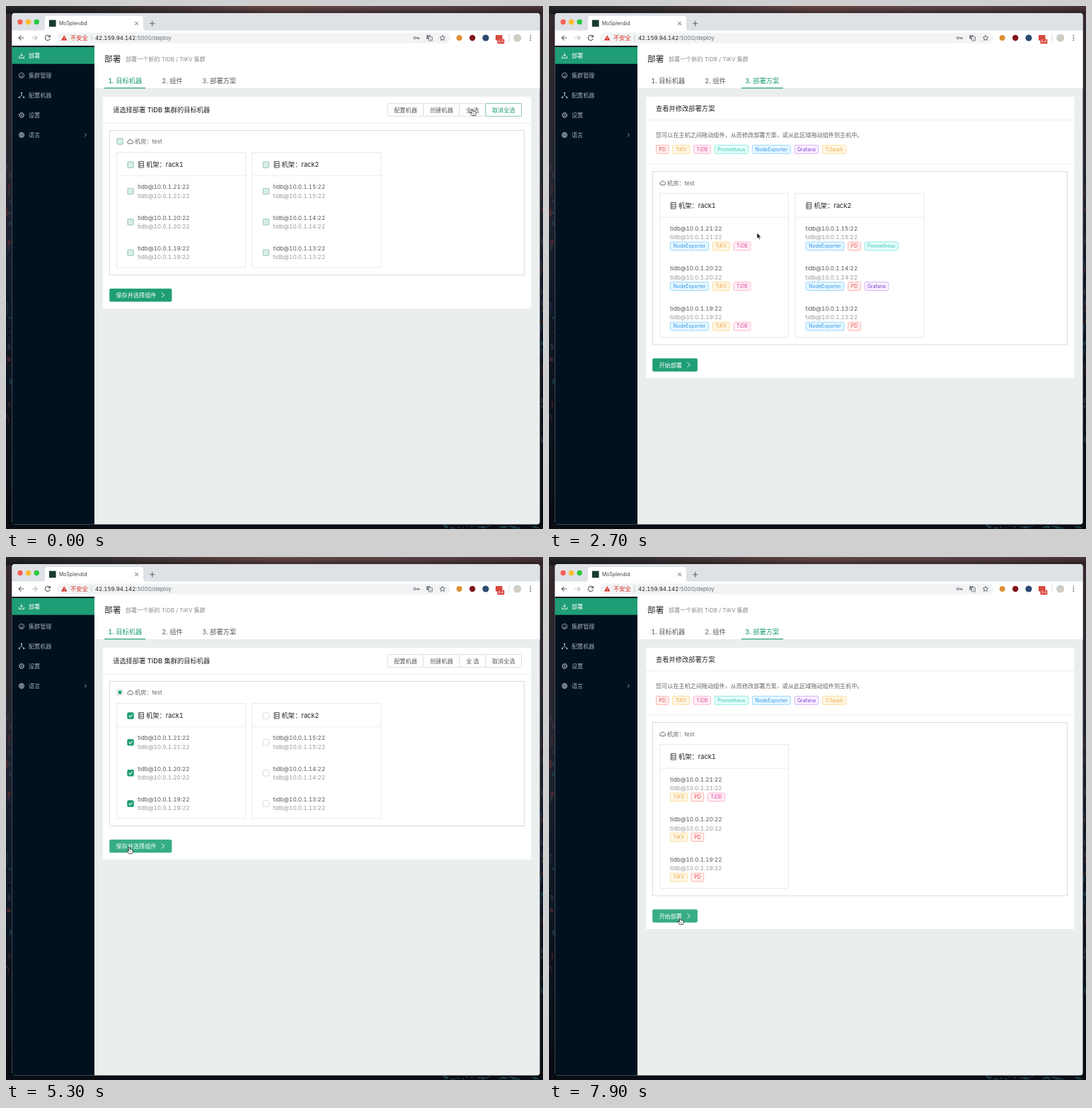
Recreate the animation shown at these times as an HTML page. Size 759 by 738 pixels, loop 8 s.

```html
<!DOCTYPE html>
<html lang="zh-CN">
<head>
<meta charset="utf-8">
<title>MoSplendid</title>
<style>
html, body { margin: 0; width: 100%; height: 100%; overflow: hidden; background: #10141b; }
svg { display: block; width: 100vw; height: 100vh; }
text { font-family: Inter, "Noto Sans CJK SC", "Noto Sans CJK", sans-serif; font-variant-numeric: tabular-nums; white-space: pre; }
</style>
</head>
<body>
<svg viewBox="0 0 759 738" preserveAspectRatio="none">
  <defs>
    <linearGradient id="top"><stop offset="0" stop-color="#24272a"/><stop offset=".2" stop-color="#3a3335"/><stop offset=".5" stop-color="#6b4a4a"/><stop offset=".8" stop-color="#5d4448"/><stop offset="1" stop-color="#4a363b"/></linearGradient>
    <linearGradient id="shade" x2="0" y2="1"><stop offset="0" stop-opacity="0"/><stop offset="1" stop-opacity=".45"/></linearGradient>
    <linearGradient id="side" x2="0" y2="1"><stop offset="0" stop-color="#33282d"/><stop offset=".3" stop-color="#252630"/><stop offset=".55" stop-color="#101a28"/><stop offset="1" stop-color="#080b11"/></linearGradient>
    <linearGradient id="face" x2="1" y2="1"><stop offset="0" stop-color="#c6d2dc"/><stop offset="1" stop-color="#d9c9b2"/></linearGradient>
  </defs>
  <g id="frame"></g>
  <g id="view"></g>
</svg>
<script>
const GREEN = '#1f9e76', HOVER = '#37ad85', LINE = '#e8e8e8', EDGE = '#d9d9d9';
const BASE = 8.17, BIG = 9.28;

const rect = (x, y, w, h, fill, more = '') =>
  `<rect x="${x}" y="${y}" width="${w}" height="${h}" fill="${fill}" ${more}/>`;
const path = (d, stroke, w = 1, more = 'fill="none"') =>
  `<path d="${d}" stroke="${stroke}" stroke-width="${w}" ${more}/>`;
const circle = (x, y, r, fill, more = '') => `<circle cx="${x}" cy="${y}" r="${r}" fill="${fill}" ${more}/>`;
const text = (x, y, s, fill = '#595959', size = BASE, more = '') =>
  `<text x="${x}" y="${y}" fill="${fill}" font-size="${size}" ${more}>${s}</text>`;
const mid = 'text-anchor="middle"', bold = 'font-weight="500"';
const outline = (color, w = .9) => `stroke="${color}" stroke-width="${w}"`;

// ---- static surroundings ----

function wallpaper() {
  let out = rect(0, 0, 759, 738, 'url(#side)') + rect(0, 0, 759, 11, 'url(#top)') +
    rect(0, 0, 759, 11, 'url(#shade)') + rect(0, 731, 759, 7, '#0a0d13');
  let seed = 7;
  const rnd = () => (seed = seed * 16807 % 2147483647) / 2147483647;
  const tones = ['#5d2a2f', '#1d4656', '#3a3440', '#0c1017'];
  for (let i = 0; i < 70; i++) {
    const x = i % 2 ? 755 + rnd() * 2 : rnd() * 5;
    out += rect(x, 190 + rnd() * 420, 1 + rnd() * 3, 2 + rnd() * 9, tones[Math.floor(rnd() * 4)], 'opacity=".65"');
  }
  // city lights along the lower right
  for (let i = 0; i < 24; i++)
    out += rect(610 + rnd() * 145, 732 + rnd() * 4, 2 + rnd() * 5, 1.5, '#2a5a6c', 'opacity=".7"');
  return out;
}

function browser() {
  const ink = '#5f6368';
  let out = rect(8.5, 10, 746, 721.5, '#ebeeee', 'rx="4"');
  out += `<path d="M8.5 35V14q0-4 4-4H750.5q4 0 4 4V35z" fill="#dee1e6"/>`;
  ['#ff5f57', '#febc2e', '#28c840'].forEach((c, i) => out += circle(20 + i * 11.6, 22.5, 3.7, c));
  out += '<path d="M51 35q4 0 4-4V18q0-4 4-4H190q4 0 4 4V31q0 4 4 4z" fill="#fff"/>';
  out += rect(61, 19.7, 9.6, 9.6, '#173b32');
  out += text(75, 27.3, 'MoSplendid', '#3c4043', 7);
  out += path('M182.3 22.3l4.6 4.6m0-4.6l-4.6 4.6', ink);
  out += path('M203 24.7h7.4M206.7 21v7.4', ink, 1.1);
  out += rect(8.5, 34.5, 746, 21.5, '#fff');
  out += path('M25.5 45h-7.5m3.4-3.4L18 45l3.4 3.4', ink, 1.1);
  out += path('M36.5 45h7.5m-3.4-3.4L44 45l-3.4 3.4', '#b9bcbf', 1.1);
  out += path('M62 43a3.6 3.6 0 1 0 .4 3M62.4 41v2.6h-2.6', ink, 1.1);
  out += rect(72, 37.5, 556, 15, '#f1f3f4', 'rx="7.5"');
  out += '<path d="M82.2 41.2l4.2 7.4h-8.4z" fill="#d93025"/>' + path('M82.2 43.8v2.2m0 .7v1', '#fff', .8);
  out += text(91, 48, '不安全', '#d93025', 8.3) + rect(120.7, 40.5, .8, 9, '#c4c7ca');
  out += text(126, 48, '42.159.94.142<tspan fill="#6b7075">:5000/deploy</tspan>', '#202124', 7.87);
  // address bar actions
  out += circle(577.7, 45, 1.6, 'none', outline(ink)) + path('M579.4 45h4.4v1.8m-1.8-1.8v1.4', ink, 1.2);
  out += rect(594.5, 41, 5, 5.6, ink, 'rx=".6"') + rect(597.5, 43.2, 5, 5.8, '#fff', `rx=".6" ${outline(ink, .8)}`);
  out += text(595.4, 45.4, 'G', '#fff', 4.2) + text(598.4, 47.8, '文', ink, 3.6);
  let star = '';
  for (let i = 0; i < 10; i++) {
    const r = i % 2 ? 1.8 : 4, a = i * Math.PI / 5;
    star += (i ? 'L' : 'M') + (617 + r * Math.sin(a)) + ' ' + (45.2 - r * Math.cos(a));
  }
  out += path(star + 'z', ink, .9);
  // extensions
  out += circle(640.7, 45, 4, '#dd9138') + circle(659.2, 45, 4.2, '#80141b') + circle(678, 45, 4.6, '#2b4a70');
  out += rect(692, 41, 9.5, 7.5, '#d64a40') + rect(694.5, 46.5, 9.8, 6.8, '#d5392f', 'rx="1"');
  out += text(699.4, 52.3, '64', '#fff', 5.8, mid);
  out += rect(710.7, 39, .8, 12, '#d0d3d6') + circle(722.7, 45, 5.6, 'url(#face)');
  for (const y of [41.8, 45, 48.2]) out += circle(741.3, y, .9, ink);
  return out;
}

function sidebar() {
  const tone = '#a5adb5';
  let out = rect(8.5, 56, 116.5, 675.5, '#01111f') + rect(8.5, 58, 116.5, 23.7, GREEN);
  ['部署', '集群管理', '配置机器', '设置', '语言'].forEach((s, i) =>
    out += text(32, 73 + i * 28, s, i ? tone : '#fff', 8.1));
  out += path('M22 66.3v4.6m-1.7-1.7l1.7 1.8 1.7-1.8M18.6 70.8v2.6h6.8v-2.6', '#fff', .9);
  out += circle(22, 98, 3.6, 'none', outline(tone)) + path('M22 98.6l1.6-1.8M20 99.8h4', tone, .9);
  out += path('M22 123v3l-3 2.6m3-2.6l3 2.6', tone, .9);
  for (const [x, y] of [[22, 122.8], [18.8, 129], [25.2, 129]]) out += circle(x, y, 1.2, tone);
  out += circle(22, 154, 3.2, 'none', outline(tone, 1.4) + ' stroke-dasharray="1.7 .8"') +
    circle(22, 154, 2.7, 'none', outline(tone, .7)) + circle(22, 154, 1.1, tone);
  out += circle(22, 182, 3.6, 'none', outline(tone)) +
    path('M18.5 182h7M22 178.5v7M19.2 180.2h5.6M19.2 183.8h5.6', tone, .7) +
    `<ellipse cx="22" cy="182" rx="1.7" ry="3.5" fill="none" ${outline(tone, .7)}/>`;
  return out + path('M111.3 179.8l2.2 2.2-2.2 2.2', tone, .9);
}

function header() {
  return rect(125, 56, 629.5, 60.5, '#fff') + rect(125, 116, 629.5, .8, LINE) +
    text(139, 79, '部署', '#262626', 11.7, bold) +
    text(169, 77.6, '部署一个新的 TiDB / TiKV 集群', '#8c8c8c', 8.1);
}

// ---- page parts ----

const square = (x, y, fill, more) => rect(x - 4.2, y - 4.2, 8.4, 8.4, fill, 'rx="1" ' + more);
const tick = (x, y, color) => path(`M${x - 2.3} ${y}l1.7 1.8 3-3.5`, color, 1.1);

function checkbox(x, y, level, edge = EDGE) {
  let out = square(x, y, '#fff', outline(edge));
  if (level) out += square(x, y, GREEN,
    `fill-opacity="${level}" stroke-opacity="${Math.min(1, level * 1.5)}" ${outline(GREEN)}`);
  return level === 1 ? out + tick(x, y, '#fff') : out;
}

const card = (title, h, line, base) => rect(137, 128, 605.5, h, '#fff') +
  rect(137, line, 605.5, .8, LINE) + text(151, base, title, '#262626', BIG, bold);

const dotted = (y, h) => rect(146.5, y, 586, h, 'none', 'stroke="#b4b4b4" stroke-dasharray="1 1"');

const button = (x, y, w, label, hot) => rect(x + .2, y + .2, w - .3, 18.6, hot ? HOVER : GREEN, 'rx="2"') +
  text(x + 9.4, y + 12.9, label, '#fff') + path(`M${x + w - 14.6} ${y + 6}l4 3.4-4 3.4`, '#fff', .9);

const cloud = (x, y) => path(`M${x - 2.4} ${y + 2.8}a1.9 1.9 0 0 1-.2-3.7a2.7 2.7 0 0 1 5.2 0a1.9 1.9 0 0 1-.2 3.7z`, '#555', .9);

const server = (x, y) => path(`M${x - 3.4} ${y - 4.2}h6.8v8.6h-6.8zm0 2.9h6.8m-6.8 2.9h6.8`, '#444', .9) +
  path(`M${x - 2.2} ${y - 2.7}h1.2m-1.2 2.9h1.2m-1.2 2.8h1.2`, '#444', .8);

const frameBox = (x, y, h, head) => rect(x + .5, y + .5, 182, h, '#fff', outline(LINE)) +
  rect(x, y + head, 183, .8, LINE);

function host(x, y, ip) {
  const s = `tidb@10.0.1.${ip}:22`;
  return text(x, y, s, '#595959') + text(x, y + 12.4, s, '#9a9a9a');
}

const RACKS = [
  { x: 156, name: 'rack1', ips: [21, 20, 19] },
  { x: 347.6, name: 'rack2', ips: [15, 14, 13] }
];

const TAGS = {
  PD: [18.5, '#e2434a', '#fff1f0', '#ffa8a3'],
  TiKV: [25, '#eba53c', '#fff7e6', '#ffd88f'],
  TiDB: [25, '#e2429a', '#fff0f6', '#ffadd2'],
  Prometheus: [48.5, '#34c3b6', '#e6fffb', '#87e8de'],
  NodeExporter: [55, '#3396ee', '#e6f7ff', '#91d5ff'],
  Grafana: [34.8, '#7a3fd0', '#f9f0ff', '#d3adf7'],
  TiSpark: [34.5, '#eba53c', '#fff7e6', '#ffd88f']
};

function tags(x, y, names) {
  return names.map(name => {
    const [w, ink, fill, edge] = TAGS[name];
    const s = rect(x + .5, y - 5.8, w - 1, 11.8, fill, 'rx="1.8" ' + outline(edge)) +
      text(x + w / 2, y + 2.4, name, ink, 6.95, mid);
    x += w + 4.7;
    return s;
  }).join('');
}

// ---- pages ----

function machines(t) {
  const first = t < 800;
  const level = first ? [.18, .6][t / 100] || 1 : 1;
  const picked = [level, t >= 4500 ? 0 : level];
  let out = card('请选择部署 TiDB 集群的目标机器', 299, 165, 150);
  const active = !first ? -1 : t < 100 ? 3 : 2;
  const edges = [539.5, 590, 641, 678, 728.5];
  const cell = i => rect(edges[i], 137.5, edges[i + 1] - edges[i], 18, '#fff', 'rx="1" ' + outline(i === active ? '#7cc5a9' : EDGE, .8)) +
    text((edges[i] + edges[i + 1]) / 2, 149.6, ['配置机器', '创建机器', '全 选', '取消全选'][i], i === active ? GREEN : '#595959', BASE, mid);
  out += [0, 1, 2, 3].map(cell).join('') + (active < 0 ? '' : cell(active));
  out += dotted(175.5, 204) + cloud(175.7, 191.3) + text(182, 194.2, '机房：test', '#666');
  out += picked[1] || first ? checkbox(161, 191, level) : checkbox(161, 191, 0) + rect(158.6, 188.6, 4.8, 4.8, GREEN);
  RACKS.forEach(({ x, name, ips }, i) => {
    out += frameBox(x, 206, 162.5, 33.3) + checkbox(x + 20, 224, picked[i]) + server(x + 35, 223.6);
    out += text(x + 42, 227.2, '机架：' + name, '#222', BIG);
    ips.forEach((ip, k) => out += checkbox(x + 20, 261.6 + k * 43.2, picked[i]) + host(x + 30, 258.4 + k * 43.2, ip));
  });
  return out + button(146, 398.5, 88.5, '保存并选择组件', t >= 600 && first || t >= 5100);
}

function parts(t) {
  const unwatched = t >= 6100;
  const rows = [
    ['PD', 'PD 组件负责协调事务与调度数据，必选', 2],
    ['TiKV', 'TiKV 组件负责存储数据，必选', 2],
    ['TiDB', 'TiDB 组件提供 SQL 层计算功能，若不勾选则只部署 KV 数据库', 1],
    ['监控（Prometheus、Node Exporter 及 Grafana）', '收集并存储所有组件及节点的监控，并提供可视化界面展示', unwatched ? 0 : 1],
    ['TiSpark', 'TiSpark 组件可以计算大型分析型 SQL（OLAP）', 0],
    ['Supervise 进程守护', '在组件进程崩溃时基于 Supervise 自动重启组件（注：不会开机自启动）', 1]
  ];
  let out = card('请选择需要部署的 TiDB 组件', 344.5, 160.5, 148);
  rows.forEach(([name, note, state], i) => {
    const y = 181 + i * 44.25;
    out += state === 2
      ? square(155.5, y, '#f5f5f5', outline(EDGE)) + tick(155.5, y, '#b0b0b0')
      : checkbox(155.5, y, state, i === 3 && unwatched ? GREEN : EDGE);
    out += text(165, y + 2.9, name, state === 2 ? '#bfbfbf' : '#555') + text(151, y + 18.7, note, '#8c8c8c');
  });
  const hot = t >= 1300 && t < 1500 || t >= 6600;
  return out + button(150.7, 440, 105.3, '保存并预览部署方案', hot);
}

function plan(t) {
  const small = t >= 6800;
  const layout = small
    ? [[['TiKV', 'PD', 'TiDB'], ['TiKV', 'PD'], ['TiKV', 'PD']]]
    : [Array(3).fill(['NodeExporter', 'TiKV', 'TiDB']),
      [['NodeExporter', 'PD', 'Prometheus'], ['NodeExporter', 'PD', 'Grafana'], ['NodeExporter', 'PD']]];
  let out = card('查看并修改部署方案', 397, 160.5, 148);
  out += text(151, 184.6, '您可以在主机之间拖动组件，从而修改部署方案，或从此区域拖动组件到主机中。', '#666', 8.14);
  out += tags(151, 202.2, Object.keys(TAGS)) + rect(137, 222.3, 605.5, .8, LINE);
  out += dotted(233.5, 244.5) + cloud(160.7, 249.8) + text(167, 252.6, '机房：test', '#666');
  layout.forEach((rows, i) => {
    const { x, name, ips } = RACKS[i];
    out += frameBox(x, 264, 203, 33.8) + server(x + 19.7, 281.7);
    out += text(x + 27, 285.2, '机架：' + name, '#222', BIG);
    rows.forEach((names, k) => {
      const y = 316.6 + k * 56.6;
      out += host(x + 15, y, ips[k]) + tags(x + 15, y + 22.2, names);
    });
  });
  return out + button(146, 497, 64, '开始部署', t >= 7900);
}

// ---- timeline ----

const PAGES = [machines, parts, plan];
const VISITS = [[0, 0], [800, 1], [1500, 2], [3700, 0], [5400, 1], [6800, 2]];
const TABS = [[139, 58, '1. 目标机器'], [215, 39, '2. 组件'], [272, 59, '3. 部署方案']];
const MOVES = [
  [0, 660, 150, 'hand'], [100, 660, 150, 'arrow'], [700, 190, 410, 'hand'], [900, 194, 392, 'beam'],
  [1100, 200, 344, 'beam'], [1300, 203, 440, 'hand'], [1400, 200, 452, 'hand'], [1500, 199, 451, 'arrow'],
  [1800, 199, 450, 'arrow'], [2600, 300, 330, 'arrow'], [3300, 190, 150, 'arrow'], [3400, 190, 150, 'arrow'],
  [3500, 178, 112, 'hand'], [3600, 176, 108, 'hand'], [3800, 176, 108, 'arrow'], [4400, 367, 226, 'hand'],
  [4600, 367, 226, 'arrow'], [5200, 176, 412, 'hand'], [5300, 175, 414, 'hand'], [5500, 175, 410, 'arrow'],
  [6000, 156, 315, 'hand'], [6200, 156, 318, 'arrow'], [6400, 159, 390, 'arrow'], [6600, 202, 450, 'hand'],
  [6700, 202, 450, 'hand'], [6800, 202, 450, 'arrow'], [7600, 286, 110, 'hand'], [7700, 262, 210, 'arrow'],
  [7900, 186, 514, 'hand']
];
const SHAPES = {
  arrow: path('M0 0v8.3l1.9-1.7 1.3 2.9 1.4-.6-1.3-2.8h2.7z', '#fff', .7, 'fill="#111"'),
  beam: path('M-2.3-4.4q2.3 0 2.3 1.4v6q0 1.4-2.3 1.4M2.3-4.4Q0-4.4 0-3M2.3 4.4Q0 4.4 0 3M-1.2 0h2.4', '#333', .9),
  hand: path('M-1.7-4.2q.8-.9 1.5.2l.5 2.6q1-.5 1.5.3 1.1-.3 1.5.6 1.3 0 1.2 1.4-.2 2-1.2 3.8h-4.6q-1.2-2-2.9-3.6-.4-1.2 1.2-.9l1.5 1z', '#222', .8, 'fill="#fff" stroke-linejoin="round"') +
    path('M.1 1.3v1.8M1.5 1.3v1.8', '#444', .5)
};

function cursor(t) {
  const i = MOVES.findLastIndex(m => m[0] <= t);
  const a = MOVES[i], b = MOVES[i + 1] || a;
  const u = b === a ? 0 : (t - a[0]) / (b[0] - a[0]), k = u * u * (3 - 2 * u);
  const at = n => a[n] + (b[n] - a[n]) * k;
  return `<g transform="translate(${at(1)} ${at(2)})">${SHAPES[a[3]]}</g>`;
}

function tabs(t, visit) {
  const [start, page] = VISITS[visit];
  const from = TABS[visit ? VISITS[visit - 1][1] : page], to = TABS[page];
  const k = 1 - (1 - Math.min(1, (t - start + 100) / 300)) ** 3;
  const mix = n => from[n] + (to[n] - from[n]) * k;
  let out = rect(mix(0), 115.2, mix(1), 1.2, GREEN);
  TABS.forEach(([x, , label], i) => {
    const hot = i === page || i === 0 && t >= 3500 && t < 3700;
    out += text(x + 5.3, 108.6, label, hot ? GREEN : '#595959', BIG, i === page ? bold : '');
  });
  return out;
}

const view = document.getElementById('view');
document.getElementById('frame').innerHTML = wallpaper() + browser() + sidebar() + header();

let shown = -1;
function draw(now) {
  const t = Math.floor(now % 8000 / 100) * 100;
  if (t !== shown) {
    shown = t;
    const visit = VISITS.findLastIndex(v => v[0] <= t);
    view.innerHTML = tabs(t, visit) + PAGES[VISITS[visit][1]](t) + cursor(t);
  }
  requestAnimationFrame(draw);
}
draw(0);
</script>
</body>
</html>
```
